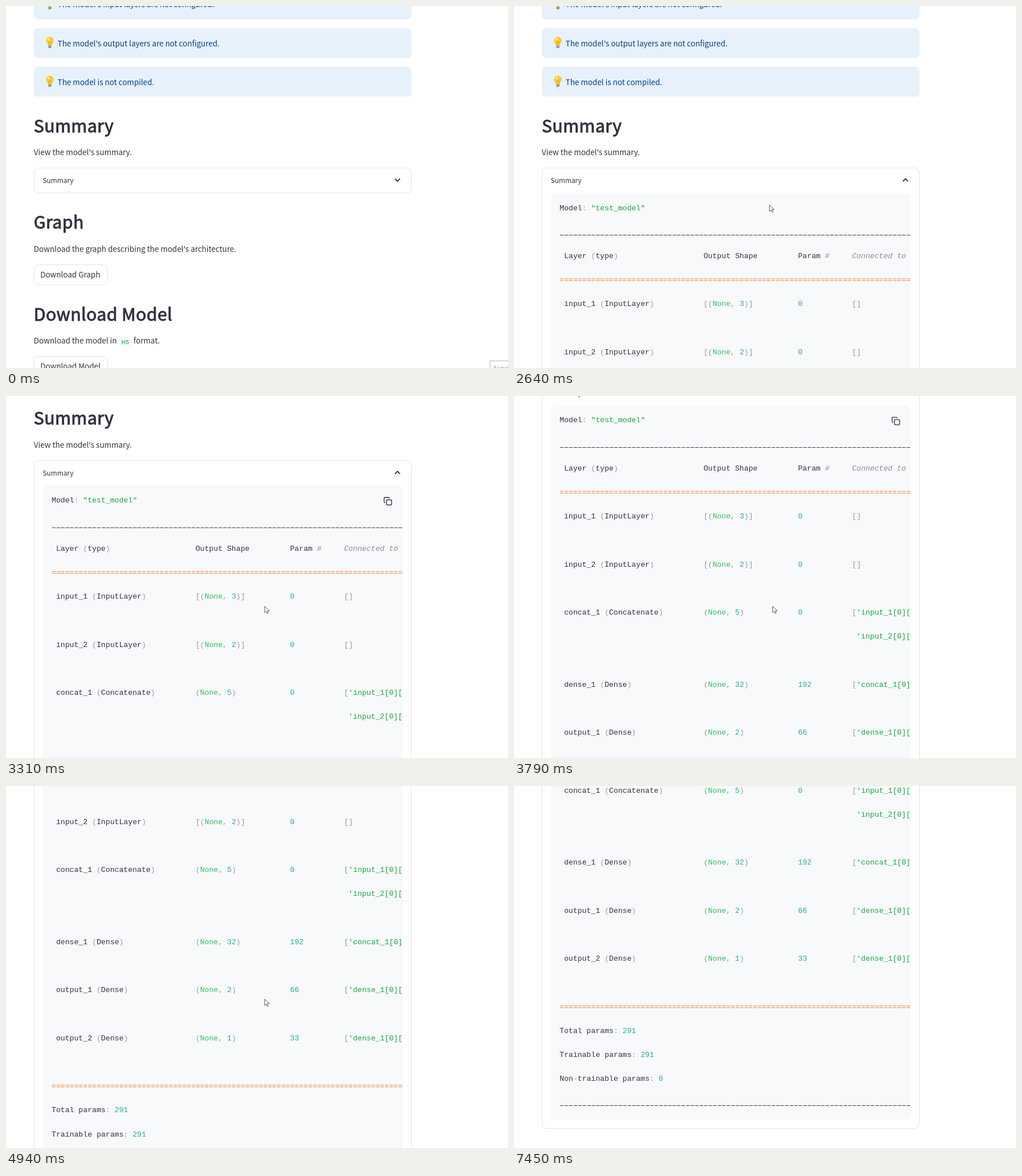
An HTML page that plays this animation: 881 by 636 pixels, repeating every 7790 ms.

```html
<!DOCTYPE html>
<html lang="en">
<head>
<meta charset="utf-8">
<style>
  html, body { margin: 0; width: 100%; height: 100%; overflow: hidden; background: #fff; }
  svg { display: block; }
  text {
    font: 13.45px "Noto Sans CJK JP", "Noto Sans CJK SC", "Noto Sans CJK", "Open Sans", sans-serif;
    fill: #31333f;
    white-space: pre;
  }
  .title { font-size: 30.2px; letter-spacing: .42px; stroke: #31333f; stroke-width: 1px; }
  .label { font-size: 11.8px; fill: inherit; }
  .alert { fill: #004280; }
  .code, .chip { font: 13.17px "Liberation Mono", "DejaVu Sans Mono", monospace; }
  .rule { font: 15.8px "Noto Sans Mono CJK JP", "Noto Sans Mono CJK SC", monospace; }
  .chip { font-size: 11.3px; fill: #09ab3b; }
  .tip { font: 11px "Noto Sans", sans-serif; fill: #999; }
  .str { fill: #18a343; }
  .none { fill: #2cc05c; }
  .num { fill: #2bab9a; }
  .op { fill: #ed7a22; }
  .punct { fill: #999; }
  .note { fill: #8a8c96; font-style: italic; }
  .frame { fill: #fff; stroke: #e4e4e8; }
</style>
</head>
<body>
<svg id="stage" width="881" height="636" viewBox="0 0 881 636"></svg>
<script>
const LOOP = 7790;
const TOP = 284.5;        // expander top edge
const HEADER = 44;        // closed expander height
const BODY = 958;         // height added when open
const OPEN_AT = 1955;
const NOTCH = 85.6;       // one mouse wheel step
const NOTCH_TIME = 200;
const wheelTimes = [2850, 3110, 3490, 3710, 4000, 4620, 4900, 5190];

const pointerStart = [875, 640];
const pointerMoves = [
  { from: 380, to: 1200, x: 14, y: 373 },
  { from: 1200, to: 1620, x: 437, y: 311 },
  { from: 2450, to: 2910, x: 453.5, y: 369 },
  { from: 4600, to: 4740, x: 453.5, y: 374 },
  { from: 5740, to: 6550, x: 692, y: 550 },
  { from: 6560, to: 6700, x: 712, y: 561 },
  { from: 6840, to: 7450, x: 840, y: 645 },
];

const clamp = v => Math.min(1, Math.max(0, v));
const easeOut = (t, from, to, power = 2) => 1 - (1 - clamp((t - from) / (to - from))) ** power;

const scrollAt = t => wheelTimes.reduce(
  (sum, start) => sum + NOTCH * easeOut(t, start, start + NOTCH_TIME), 0);

const pointerAt = t => pointerMoves.reduce(([px, py], { from, to, x, y }) => {
  const k = easeOut(t, from, to);
  return [px + (x - px) * k, py + (y - py) * k];
}, pointerStart);

const text = (x, y, str, cls = "") => `<text x="${x}" y="${y}" class="${cls}">${str}</text>`;
const box = (x, y, w, h, attrs = "", r = 7.5) =>
  `<rect x="${x}" y="${y}" width="${w}" height="${h}" rx="${r}" ${attrs}/>`;
const section = (y, title, description) =>
  text(48.8, y, title, "title") + text(48.8, y + 40.5, description);
const button = (y, w, label) =>
  box(49.5, y, w, 35.5, 'class="frame"') + text(60.2, y + 22.6, label);

const alertBox = (str, i) => `<g transform="translate(0 ${-29.4 + 68.1 * i})">
  ${box(49, 0, 662.6, 52.6, 'fill="#e7f1fb"')}
  <path d="M74.2 30h5.6v4.2q-2.8 2.6-5.6 0z" fill="#8b9aa3"/>
  <path d="M74 31q0-2-1.6-4a6.6 6.6 0 1 1 9.2 0q-1.6 2-1.6 4z" fill="#fcc934"/>
  <path d="M75.5 30l-1-6 2.5 1.5 2.5-1.5-1 6" fill="none" stroke="#e9a01c" stroke-width=".9"/>
  <ellipse cx="74.6" cy="19.8" rx="1.5" ry="2.3" fill="#fff3b8"/>
  ${text(90.6, 31.9, str, "alert")}</g>`;

const alerts = [
  "The model's input layers are not configured.",
  "The model's output layers are not configured.",
  "The model is not compiled.",
].map(alertBox).join("");

const tokenRule = /(?<note>#.*)|(?<str>'[^']*'|"[^"]*")|(?<none>None)|(?<id>[A-Za-z_]\w*)|(?<num>\d+)|(?<op>[=-]+)|(?<punct>[()[\]:,]+)/g;
const highlight = line => line.replace(tokenRule, (match, ...rest) => {
  const groups = rest[rest.length - 1];
  const kind = Object.keys(groups).find(name => groups[name]);
  return kind === "id" ? match : `<tspan class="${kind}">${match}</tspan>`;
});
const columns = (layer, shape, params, links) =>
  ` ${layer}`.padEnd(32) + shape.padEnd(21) + params.padEnd(12) + links;

const code = [
  'Model: "test_model"',
  "_".repeat(98),
  columns("Layer (type)", "Output Shape", "Param #", "Connected to"),
  "=".repeat(98),
  columns("input_1 (InputLayer)", "[(None, 3)]", "0", "[]"),
  "",
  columns("input_2 (InputLayer)", "[(None, 2)]", "0", "[]"),
  "",
  columns("concat_1 (Concatenate)", "(None, 5)", "0", "['input_1[0][0]',"),
  columns("", "", "", " 'input_2[0][0]']"),
  "",
  columns("dense_1 (Dense)", "(None, 32)", "192", "['concat_1[0][0]']"),
  "",
  columns("output_1 (Dense)", "(None, 2)", "66", "['dense_1[0][0]']"),
  "",
  columns("output_2 (Dense)", "(None, 1)", "33", "['dense_1[0][0]']"),
  "",
  "=".repeat(98),
  "Total params: 291",
  "Trainable params: 291",
  "Non-trainable params: 0",
  "_".repeat(98),
].map((line, i) =>
  text(80, 358.6 + i * 42.22, highlight(line), line[0] === "_" ? "rule" : "code")).join("");

document.getElementById("stage").innerHTML = `
  <clipPath id="clip"><rect id="clipBox" x="65" y="328.3" width="631.5"/></clipPath>
  <g id="page">
    ${alerts}
    ${section(221.6, "Summary", "View the model's summary.")}
    <rect id="expander" class="frame" x="49.5" y="${TOP}" width="662" rx="7.5"/>
    <g id="body" clip-path="url(#clip)">
      ${box(65, 328.3, 631.5, 942.5, 'fill="#f8f9fb"')}
      ${code}
      <g id="copy" fill="none" stroke="#31333f" stroke-width="1.4" stroke-linejoin="round">
        ${box(667.7, 353.7, 9, 9, "", 1.5)}
        <path d="M665.5 358.5h-.6q-1.3 0-1.3-1.3v-6.4q0-1.3 1.3-1.3h6.4q1.3 0 1.3 1.3v.6"/>
      </g>
      ${box(65, 1265.6, 505, 5.2, 'id="scrollbar" fill="#a9a9b1"', 2.6)}
    </g>
    <g id="header">
      ${text(64.6, 311.4, "Summary", "label")}
      <path id="chevron" fill="none" stroke="currentColor" stroke-width="1.9"/>
    </g>
    <g id="below">
      ${section(391.2, "Graph", "Download the graph describing the model's architecture.")}
      ${button(454.5, 128.5, "Download Graph")}
      ${section(552.8, "Download Model", "Download the model in")}
      ${box(198, 581, 23, 16.5, 'fill="#f8f9fb"', 3.5)}
      ${text(202.6, 593.6, "H5", "chip")}
      ${text(223.8, 593.3, "format.")}
      ${button(615.5, 129, "Download Model")}
    </g>
  </g>
  <g id="tooltip">
    ${box(849.5, 623.5, 60, 30, 'fill="#fff" stroke="#b4b4b4"', 0)}
    ${text(854.5, 639.5, "Запись", "tip")}
  </g>
  <g id="pointer" fill="#fff" stroke="#45454d" stroke-width=".9" stroke-linejoin="round">
    <path id="arrow" d="M.5.5V11.6L3.2 9.1 5 13.1 6.8 12.3 5 8.4H8.7z"/>
    <path id="hand" d="M-1.2 9V1.4a1.2 1.2 0 0 1 2.4 0V6a1.2 1.2 0 0 1 2.2.3a1.2 1.2 0 0 1 2.2.4a1 1 0 0 1 2 .6V11q0 4.5-3.6 4.8H1.2q-1.8 0-3-2.4L-4 9.8q-.3-1.8 1.2-1.6L-1.2 10z"/>
  </g>`;

const set = (id, name, value) => document.getElementById(id).setAttribute(name, value);
const show = (id, opacity) => set(id, "opacity", Number(opacity));

function draw(t) {
  const [x, y] = pointerAt(t);
  const isOpen = t >= OPEN_AT;
  const opened = easeOut(t, OPEN_AT, OPEN_AT + 500, 5);
  const extra = BODY * opened;
  const overHeader = x > 49 && x < 711 && y > TOP && y < TOP + HEADER;
  const overCode = isOpen && y > TOP + HEADER && x < 696;
  const tint = overHeader ? "#ff4b4b" : "#31333f";

  set("page", "transform", `translate(0 ${-scrollAt(t)})`);
  set("expander", "height", HEADER + extra);
  set("clipBox", "height", extra);
  set("below", "transform", `translate(0 ${extra})`);
  show("body", opened);
  show("scrollbar", overCode);
  show("copy", overCode && clamp((t - 2700) / 140));

  set("header", "fill", tint);
  set("header", "color", tint);
  set("chevron", "d", isOpen ? "M682.6 308l4.4-4.4 4.4 4.4" : "M682.6 303.4l4.4 4.4 4.4-4.4");

  set("pointer", "transform", `translate(${x} ${y})`);
  show("arrow", !overHeader);
  show("hand", overHeader);
  show("tooltip", clamp((130 - t) / 60));
}

const start = performance.now();
function tick() {
  draw((performance.now() - start) % LOOP);
  requestAnimationFrame(tick);
}
tick();
</script>
</body>
</html>
```
